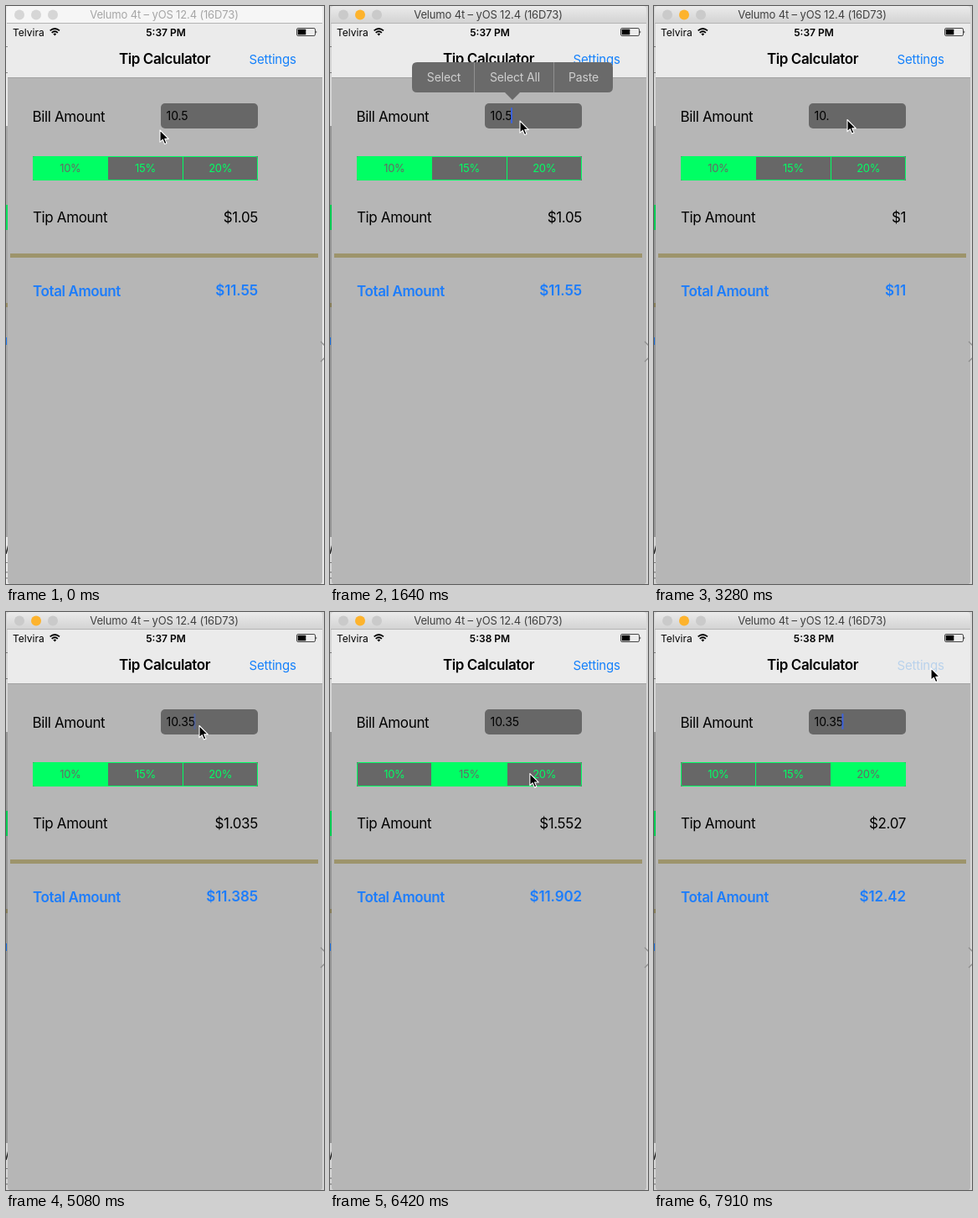
An HTML page for the animation above (8000 ms loop, 380 by 689 pixels).

```html
<!DOCTYPE html>
<html lang="en">
<head>
<meta charset="utf-8">
<title>Tip Calculator</title>
<style>
  html, body { margin: 0; width: 100%; height: 100%; overflow: hidden; background: #fff; }
  svg { display: block; width: 380px; height: 689px; }
  text { font-family: Inter, Roboto, "Liberation Sans", sans-serif; font-size: 17px; letter-spacing: -.36px; fill: #000; white-space: pre; }
  .mid { text-anchor: middle; }
  .end { text-anchor: end; }
  .bold { font-weight: 600; letter-spacing: -.4px; }
  .sum { font-weight: 600; letter-spacing: -.12px; }
  .blue { fill: #1d7dfb; }
  .bar { font-size: 13px; letter-spacing: -.15px; }
  .status { font-size: 12px; letter-spacing: 0; }
  .field { font-size: 14px; letter-spacing: -.05px; }
  .link { font-size: 15px; letter-spacing: -.2px; }
  .menu { font-size: 14px; letter-spacing: -.15px; fill: #cfcfcf; }
  .seg { font-size: 13px; letter-spacing: -.3px; }
</style>
</head>
<body>
<svg viewBox="0 0 380 689">
  <defs>
    <linearGradient id="chrome" x2="0" y2="1">
      <stop stop-color="#ebebeb"/><stop offset="1" stop-color="#d2d2d2"/>
    </linearGradient>
  </defs>

  <!-- slivers of the window behind -->
  <rect width="380" height="689" fill="#f3f3f3"/>
  <path d="M0 48.5H2M0 79.5H2M0 663.5H2" stroke="#8a8a8a"/>
  <rect y="143" width="2" height="490" fill="#ababab"/>
  <rect y="237" width="2" height="30" fill="#00e860"/>
  <rect y="354" width="2" height="5" fill="#9b9168"/>
  <rect y="395" width="1" height="9" fill="#1d7dfb"/>
  <path d="M0 653L3 642" stroke="#222" stroke-width="1.5"/>
  <path d="M0 675H2M0 682H2" stroke="#777"/>
  <rect id="shade" width="380" height="689"/>

  <!-- title bar -->
  <path id="titleBar" d="M1 21V4Q1 0 5 0H374Q378 0 378 4V21Z"/>
  <path d="M1 20.5H378" stroke="#b4b4b4"/>
  <g id="lights">
    <circle cx="16" cy="10.5" r="6"/>
    <circle cx="36" cy="10.5" r="6"/>
    <circle cx="56" cy="10.5" r="6"/>
  </g>
  <text id="title" class="bar mid" x="189" y="15">Velumo 4t – yOS 12.4 (16D73)</text>

  <!-- screen -->
  <path d="M2 21V686Q2 689 5 689H375Q378 689 378 686V21Z" fill="#b6b6b6"/>
  <rect x="2" y="21" width="376" height="64" fill="#ebebeb"/>
  <path d="M2 85.5H378" stroke="#a2a2a2"/>
  <path d="M376 400L388 412L376 424" fill="none" stroke="#8f8f8f" stroke-width="1.3"/>

  <text class="status" x="8" y="35.5">Telvira</text>
  <g fill="none" stroke="#000" stroke-width="1.7">
    <path d="M52.6 29.4Q58.3 24.6 64 29.4M54.7 31.8Q58.3 28.7 61.9 31.8"/>
    <path d="M56.4 33.3Q58.3 31.6 60.2 33.3L58.3 35.4Z" fill="#000" stroke="none"/>
  </g>
  <text id="clock" class="status mid" x="191" y="35.5" font-weight="600"></text>
  <rect x="347.5" y="26.5" width="22" height="9" rx="1.6" fill="none" stroke="#333" stroke-width=".9"/>
  <rect x="348.7" y="27.7" width="9.6" height="6.6" rx=".6"/>
  <path d="M370.5 29.3Q372.3 31 370.5 32.8Z"/>

  <text class="bold mid" x="189.5" y="69">Tip Calculator</text>
  <text id="link" class="link" x="290.5" y="69">Settings</text>

  <text x="31.5" y="137.5">Bill Amount</text>
  <rect x="185" y="116" width="116" height="30" rx="5" fill="#676767"/>
  <text id="bill" class="field" x="191.5" y="136"></text>
  <rect id="caret" y="121" width="2" height="19" rx="1" fill="#3d63dc"/>

  <g id="segments"></g>

  <text x="32" y="258">Tip Amount</text>
  <text id="tip" class="end" x="301" y="258"></text>
  <rect x="5" y="295" width="368" height="5" fill="#9d946b"/>
  <text class="bold blue" x="32" y="345.5">Total Amount</text>
  <text id="total" class="sum blue end" x="301" y="345"></text>

  <g id="menu">
    <path d="M104 67H332Q338 67 338 73V97Q338 103 332 103H227L218 112L209 103H104Q98 103 98 97V73Q98 67 104 67Z" fill="#6a6a6a"/>
    <path d="M172.5 67V103M267.5 67V103" stroke="#909090"/>
    <text class="menu mid" x="136" y="90">Select</text>
    <text class="menu mid" x="221" y="90">Select All</text>
    <text class="menu mid" x="303" y="90">Paste</text>
  </g>

  <path id="cursor" d="M0 0V14.2L3.3 11.2L5.6 16.6L8 15.6L5.7 10.4H10.3Z" fill="#000" stroke="#fff" stroke-width="1.1" stroke-linejoin="round"/>
</svg>

<script>
// The screen refreshes in even ticks; all times below are counted in them.
const LOOP = 8000, TICK = 149.25;
const BLINK = 7;
const RATES = [10, 15, 20];
const GREEN = [0, 255, 100], GREY = [103, 103, 103];

const edits = [
  { at: 1, text: '10.5' }, { at: 17, text: '10.' },
  { at: 28, text: '10.3' }, { at: 30, text: '10.35' }
];
const picks = [{ at: 0, index: 0 }, { at: 39, index: 1 }, { at: 44, index: 2 }];
const moves = [
  { from: 0, to: 6, x: 227, y: 137 },
  { from: 12, to: 14, x: 231, y: 135.5 },
  { from: 34, to: 38, x: 184, y: 190 },
  { from: 40, to: 44, x: 249, y: 193 },
  { from: 45, to: 47, x: 347, y: 72 },
  { from: 47, to: 50, x: 331, y: 67 }
];

const $ = id => document.getElementById(id);
const clamp = v => Math.min(1, Math.max(0, v));
const ramp = (n, from, to) => clamp((n - from) / (to - from));
const ease = k => k * k * (3 - 2 * k);
const latest = (list, n) => list.filter(e => e.at <= n).pop() || list[0];
const mix = (a, b, k) => `rgb(${a.map((v, i) => Math.round(v + (b[i] - v) * k))})`;
const money = v => '$' + Math.floor(v * 1000 + 1e-5) / 1000;

function add(parent, tag, attrs, text = '') {
  const node = document.createElementNS('http://www.w3.org/2000/svg', tag);
  for (const key in attrs) node.setAttribute(key, attrs[key]);
  node.textContent = text;
  return parent.appendChild(node);
}

function setText(id, value) {
  if ($(id).textContent !== value) $(id).textContent = value;
}

const group = $('segments');
const cell = 269 / RATES.length;
add(group, 'rect', { x: 32, y: 179, width: 269, height: 29, fill: mix(GREY, GREY, 0) });
const segments = RATES.map((rate, i) => {
  const x = 32 + i * cell;
  return {
    box: add(group, 'rect', { x, y: 179.5, width: cell, height: 28 }),
    label: add(group, 'text', { class: 'seg mid', x: x + cell / 2, y: 198 }, rate + '%')
  };
});
const line = { fill: 'none', stroke: mix(GREEN, GREEN, 0) };
add(group, 'rect', { x: 32.5, y: 179.5, width: 268, height: 28, rx: 2, ...line });
add(group, 'path', { d: 'M121.5 180V207M211.5 180V207', ...line });

function cursorAt(n) {
  let x = 184, y = 148;
  for (const m of moves) {
    const k = ease(ramp(n, m.from, m.to));
    x += (m.x - x) * k;
    y += (m.y - y) * k;
  }
  return [x, y];
}

// Caret fades out and back around the dark part of each blink.
function caretAt(n, base) {
  const phase = (n - base + BLINK) % BLINK;
  const d = Math.abs(phase - 5.5);
  return clamp(Math.min(d, BLINK - d) - 1.05);
}

function drawWindow(active) {
  $('titleBar').setAttribute('fill', active ? 'url(#chrome)' : '#f6f6f6');
  $('title').style.fill = active ? '#404040' : '#a6a6a6';
  $('shade').setAttribute('opacity', active ? .12 : .03);
  [...$('lights').children].forEach((dot, i) => {
    dot.setAttribute('fill', !active ? '#d6d6d6' : i === 1 ? '#fdb32d' : '#cacaca');
  });
}

function drawSegments(n, pick) {
  const fade = pick.at ? ramp(n, pick.at - .5, pick.at + .5) : 1;
  segments.forEach(({ box, label }, i) => {
    const k = i === pick.index ? fade : i === pick.index - 1 ? 1 - fade : 0;
    box.setAttribute('fill', mix(GREY, GREEN, k));
    label.style.fill = mix(GREEN, GREY, k);
  });
}

function draw(n) {
  const edit = latest(edits, n), pick = latest(picks, n);
  const bill = parseFloat(edit.text);
  const tip = bill * RATES[pick.index] / 100;

  drawWindow(n >= 8);
  drawSegments(n, pick);
  setText('clock', n < 43 ? '5:37 PM' : '5:38 PM');
  setText('bill', edit.text);
  setText('tip', money(tip));
  setText('total', money(bill + tip));

  $('caret').setAttribute('x', 189.9 + $('bill').getComputedTextLength());
  $('caret').setAttribute('opacity', caretAt(n, edit.at));
  $('menu').setAttribute('opacity', ramp(n, 9, 11) * (1 - ramp(n, 15, 18)));
  $('link').style.fill = n >= 53 ? '#b9d2ec' : '#1480fb';
  $('cursor').setAttribute('transform', `translate(${cursorAt(n)})`);
}

const begin = performance.now();
function frame() {
  const t = (performance.now() - begin) % LOOP;
  draw(Math.floor((t + 8) / TICK));
  requestAnimationFrame(frame);
}
frame();
</script>
</body>
</html>
```
